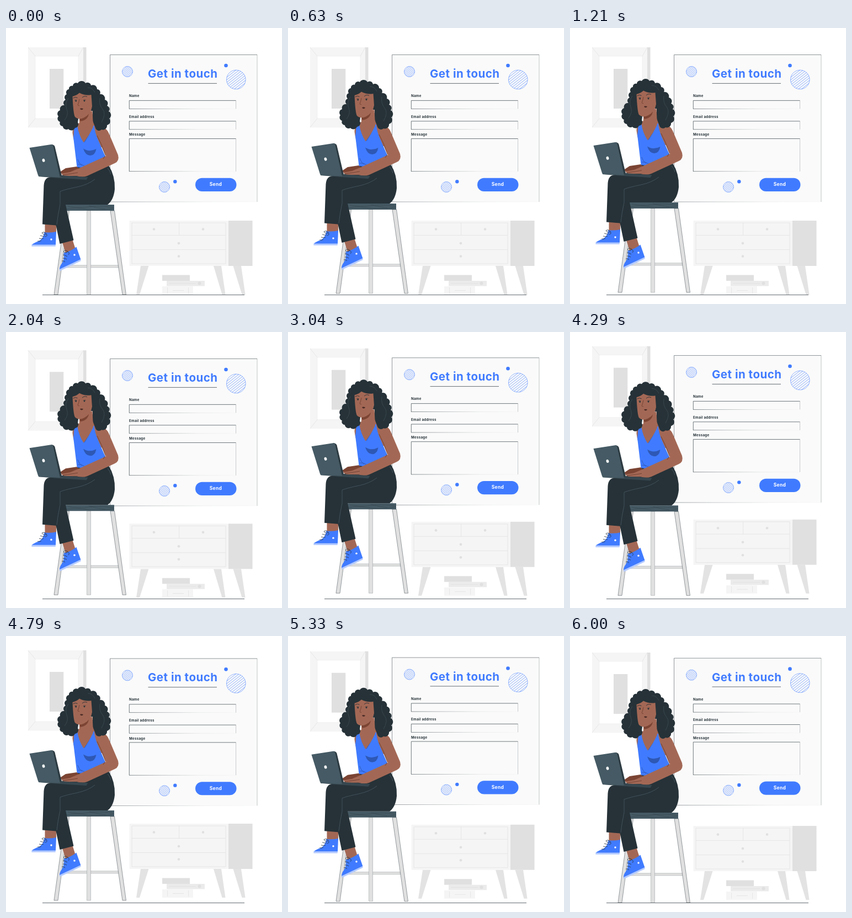
Recreate the animation shown at these times as an HTML page. Size 500 px wide and 500 px high, loop 6.04 s.

```html
<!DOCTYPE html>
<html lang="en">
<head>
<meta charset="utf-8">
<title>Get in touch</title>
<style>
  html, body { margin: 0; width: 100%; height: 100%; overflow: hidden; background: #fff; }
  svg { display: block; width: 100vw; height: 100vh; }
  text { font-family: Inter, "Open Sans", sans-serif; font-weight: 700; }
  .label { font-size: 6.2px; letter-spacing: .27px; fill: #263238; }
  .ink { stroke: #263238; fill: none; }
  .pale { fill: #f5f5f5; }
  .grey { fill: #e0e0e0; }
  .rule { fill: none; stroke: #e0e0e0; stroke-width: .7; }
  .blue { fill: #407bff; }
  .dark { fill: #263238; }
  .slate { fill: #455a64; }
  .skin { fill: #a36855; }
  .shade { fill: #7b4433; }
</style>
</head>
<body>
<svg viewBox="0 0 500 500" xmlns="http://www.w3.org/2000/svg">
  <defs>
    <linearGradient id="fade">
      <stop offset="0" stop-color="#263238" stop-opacity=".9"/>
      <stop offset=".3" stop-color="#263238" stop-opacity=".5"/>
      <stop offset=".65" stop-color="#263238" stop-opacity=".12"/>
      <stop offset="1" stop-color="#263238" stop-opacity=".03"/>
    </linearGradient>
  </defs>

  <g id="room">
    <path class="grey" d="M140 35h5.500v145H140z"/>
    <path class="pale" d="M40 35h100v145.500H40z"/>
    <path fill="#fff" stroke="#e6e6e6" stroke-width=".5" d="M53 51h78v113H53z"/>
    <path class="rule" d="M40 35l13 16M140 35l-9 16M40 180l13-16M140 180l-9-16"/>
    <path class="grey" d="M79 74h25.300v72H79z"/>

    <path fill="#e3e3e3" d="M244 431h14.500L242 483h-6zM376 431h14l7.500 52h-6zM411.500 431H426l7.500 52h-6z"/>
    <path class="pale" d="M223.500 349H403v82H223.500z"/>
    <path class="grey" d="M403 349h43.500v82H403z"/>
    <path class="rule" d="M228 353h170v74H228zM228 375.500h170M228 401.500h170M313.500 353v22.500"/>
    <g class="grey">
      <circle cx="268" cy="364.500" r="2.300"/><circle cx="357" cy="364.500" r="2.300"/>
      <circle cx="313" cy="390" r="2.300"/><circle cx="313" cy="413.500" r="2.300"/>
      <path d="M283 447.500h50V458h-50z"/>
    </g>
    <path fill="#ebebeb" d="M291 458h69v9.500h-69z"/>
    <circle class="grey" cx="350.500" cy="462.600" r="3"/>
    <path class="pale" d="M283 468h56v15h-56z"/>
    <path class="rule" d="M295 462.700h49M292.500 470v11M330.500 470v11M302 475.500h20"/>
  </g>

  <g id="panel">
    <path fill="#fafafa" d="M188.500 48.500H455V315H188.500z"/>
    <path class="ink" stroke-width=".6" opacity=".85" d="M188.500 315V48.500H455"/>
    <path class="ink" stroke-width=".4" opacity=".7" d="M455 48.500V315"/>
    <path fill="url(#fade)" d="M188.500 314.700H455v.5H188.500z"/>
    <text class="blue" x="320.300" y="90" font-size="20.500" letter-spacing=".5" text-anchor="middle">Get in touch</text>
    <path class="ink" stroke-width=".7" d="M257.500 100.400H382"/>
    <g id="form"></g>
    <rect class="blue" x="343" y="271.800" width="74.500" height="24.200" rx="12.100"/>
    <text x="380" y="286.300" font-size="8.500" letter-spacing=".3" text-anchor="middle" fill="#fff">Send</text>
    <g id="bubbles" stroke="#407bff" fill="none" stroke-width=".55"></g>
    <circle class="blue" cx="398.500" cy="68" r="3.300"/>
    <circle class="blue" cx="306.300" cy="278.300" r="3.200"/>
  </g>

  <path class="ink" stroke-width=".8" opacity=".9" d="M66 483.500H432"/>

  <g id="woman">
    <g stroke="#263238" stroke-width=".45" fill="#e0e0e0">
      <path stroke="#8a9094" d="M99 429.800h107v4.200H98.500z"/>
      <path d="M108 331h6.500L94 483h-7zM189 331h7.500l21 152h-6.500z"/>
      <path stroke="#8a9094" d="M146.500 331h7v152h-7z"/>
    </g>
    <path class="slate" d="M103 320h93v11h-93z"/>
    <path class="ink" stroke-width=".5" opacity=".55" d="M112 323q20 4 38 1t45 1M110 328q16-4 34 0t51-1M150 322q14 4 30 6"/>

    <path class="skin" d="M70.500 354H91v18H70.500zM102 388l18-6 6 19-18 7z"/>
    <path class="blue" d="M69.500 370q10 1.500 21.500-1L90 393H46.500q4-4 12-6.500 9-4 11-16.500z"/>
    <path fill="#b3caff" d="M46.500 392.500H90l-.4 3.300H46.300z"/>
    <path class="blue" d="M104.500 407.500q13-3 23-11l8 23-38.500 18q0-6 4.500-11.500 4.500-7 3-18.500z"/>
    <path fill="#b3caff" d="M97 437l38.300-18 .3 3-38 18.300z"/>
    <path class="ink" stroke-width=".8" d="M65 371q5-3 8 2-5 3-8-2m8 2q3 4-2 5M62 376q5 2 8 1m-10 4q5 2 8 0m-11 5q5 1 7-1
      M104 405q4-4 8 0-4 4-8 0m8 0q4 3 1 6M103 411q4 0 8 3m-8 3q4 0 7 2m-9 3q4-1 6 2"/>
    <circle cx="82" cy="383" r="1.700" fill="#fff"/><circle cx="124" cy="411" r="1.700" fill="#fff"/>

    <path class="dark" d="M129 250L186 249Q198 268 197 292 195 312 184 320H108L122.500 384.500 97.500 391 90.500 357.500 66 355.500 68.500 285Q69.500 270 82 270L129 262z"/>
    <path fill="none" stroke="#60717a" stroke-width=".5" d="M161 274q-13 10-32 14-20 4-31 8v24q-4 18-6 36M184 254q5 5 6 11"/>

    <path class="skin" d="M134 156H166L176 179 180 215 130 222Q122 205 120.500 190 120 177 133 172z"/>
    <path class="blue" d="M123.500 182L129 176Q132 194 140.500 207.500 151 196 157.500 177L160 177Q161 190 167 203L187 249Q160 257 128.500 252L122 198Q123 190 123.500 182z"/>
    <path fill="#2e58b5" d="M140 218.500q11 7 23.500.5-2 12-11 12-9-.5-12.500-12.500z"/>
    <path fill="none" stroke="#2e58b5" stroke-width=".9" d="M130 238q3 9 8 11m-8-2q7-1 12 3M142 207q8-12 13-25"/>

    <path class="shade" d="M96 262l12-8 20-3 8 7-20 10z"/>
    <path class="skin" d="M160 179Q180 176 186 190L203 230Q206 241 197 245L147 268Q139 271 128 268L106 268 99 264 116 261 137 252 181 232 167 202Q162 190 160 179z"/>
    <path fill="none" stroke="#5c3329" stroke-width=".7" d="M165 195q9 16 15 36l-4 6M103 266l15-2 12-2"/>

    <path fill="#37474f" d="M60 266L100 267 148.500 270.300 145.500 275 97 272 59 269z"/>
    <path fill="#2c3a41" d="M82 211q5 0 6.500 4L101 268h-7z"/>
    <path class="slate" d="M42.500 217L81.500 211Q84.500 210.500 85.500 214L98 270.500 61 269Q58.500 269 58 266.500z"/>
    <ellipse cx="68" cy="239.700" rx="2.400" ry="3.100" fill="#fff" transform="rotate(-12 68 239.700)"/>

    <path id="hair" class="dark"/>
    <path fill="none" stroke="#4b5a61" stroke-width=".5" d="M113 127q-7 10-3 20t-4 20M170 127q-2 12 5 20t-2 24M148 108q9 0 13 9"/>
    <path class="skin" d="M133 154L156.500 150 158 179Q150 196 141 206 132 195 130 179L133 172z"/>
    <path class="shade" d="M133 164.500q10-1 17-10-1 12-15 14.500z"/>
    <path class="skin" d="M120.500 124Q128 122 133 117.500 143 123 154.500 121L156 142Q154 156 141 162.500 131 167 125 161 122 157 120.500 124z"/>
    <g class="ink" stroke-width=".9">
      <path d="M121.500 127q4-3 8-.5M138 126q4-4 9-1.500"/>
      <path stroke="#6b3a2c" stroke-width=".8" d="M133 129q-1 6-3 10.500 1 1.500 3 1"/>
    </g>
    <ellipse class="dark" cx="126.700" cy="132" rx="1.300" ry="1.600"/>
    <ellipse class="dark" cx="142" cy="131.800" rx="1.300" ry="1.600"/>
    <path class="ink" stroke-width=".5" d="M124 131q2-2 4.500-.3M139.500 131q2-2 5.500-.5"/>
    <path fill="#4a2a25" d="M134 146.500q2-1.800 3-.8 1.500-.6 3 .8-3 3.500-6 0z"/>
  </g>
</svg>
<script>
  const byId = id => document.getElementById(id);

  // A form field: firm left and top edges, lower edge fading to the right.
  const field = (label, labelY, y, h) => `
    <text class="label" x="223" y="${labelY}">${label}</text>
    <path class="ink" stroke-width=".65" d="M223.300 ${y + h}V${y}H416.500"/>
    <path class="ink" stroke-width=".4" opacity=".6" d="M416.500 ${y}v${h}"/>
    <rect x="223" y="${y + h - .3}" width="193.500" height=".6" fill="url(#fade)"/>`;
  byId('form').innerHTML =
    field('Name', 125, 131.400, 15) +
    field('Email address', 162.500, 168.800, 15) +
    field('Message', 195.300, 200.500, 59.300);

  function hatchedCircle(cx, cy, r, gap, angle) {
    let lines = '';
    for (let d = gap - r; d < r; d += gap) {
      const half = Math.sqrt(r * r - d * d);
      lines += `M${cx - half} ${cy + d}h${2 * half}`;
    }
    return `<circle cx="${cx}" cy="${cy}" r="${r}"/>
      <path d="${lines}" transform="rotate(${angle} ${cx} ${cy})"/>`;
  }
  byId('bubbles').innerHTML =
    hatchedCircle(220, 79, 9.500, 2.400, -50) +
    hatchedCircle(416.800, 93.500, 17.300, 3.600, -38) +
    hatchedCircle(287, 288, 9.500, 2.400, -50);

  // Curls bulge outwards between neighbouring points.
  const curls = [[130, 171], [125, 181], [113, 183], [103, 178], [98, 170], [95, 160], [98, 149],
    [106, 140], [108, 130], [110, 120], [114, 111], [121, 105], [130, 100], [144, 100], [154, 104],
    [165, 111], [170, 120], [179, 130], [183, 141], [186, 151], [187, 164], [183, 176], [173, 184], [162, 181]];
  byId('hair').setAttribute('d', curls.map(([x, y], i) => {
    if (!i) return `M${x} ${y}`;
    const [px, py] = curls[i - 1];
    const r = Math.hypot(x - px, y - py) * .58;
    return `A${r} ${r} 0 0 1 ${x} ${y}`;
  }).join('') + 'L157 168V150H133z');

  const LOOP = 6040, PERIOD = 6000, RISE = 10;
  const delays = { woman: 0, room: 1500, panel: 2500 };

  // Steady rise and fall that begins after the delay.
  function floatY(time, delay) {
    if (time < delay) return 0;
    const phase = (time - delay) % PERIOD / (PERIOD / 2);
    return -RISE * (1 - Math.abs(1 - phase));
  }

  function draw(time) {
    for (const [id, delay] of Object.entries(delays))
      byId(id).setAttribute('transform', `translate(0 ${floatY(time, delay).toFixed(3)})`);
  }

  const start = performance.now();
  function tick() {
    draw((performance.now() - start) % LOOP);
    requestAnimationFrame(tick);
  }
  tick();
</script>
</body>
</html>
```
